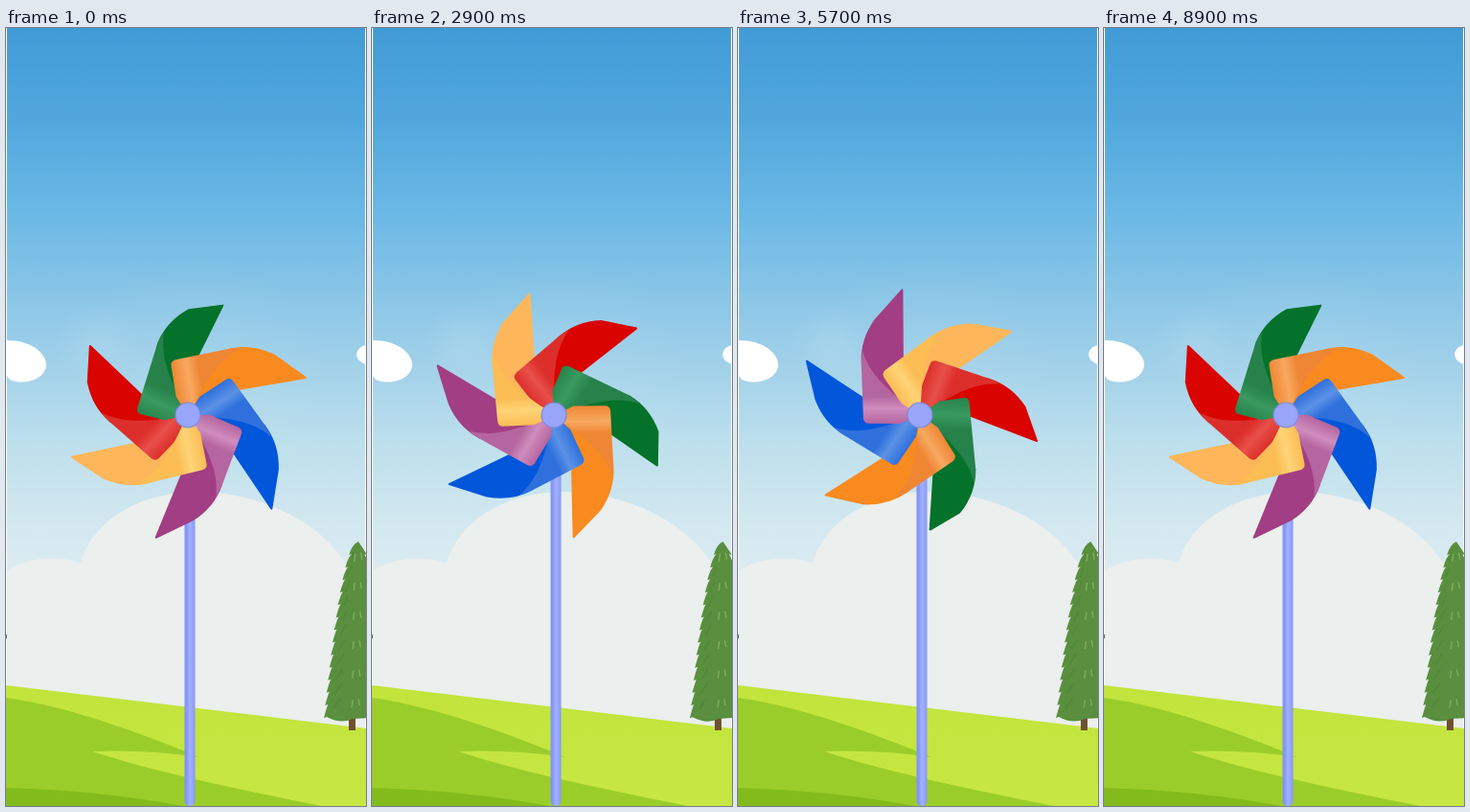
Write an HTML page with a canvas that moves like this. It is 376 by 812 pixels and loops after 9 s.

```html
<!DOCTYPE html>
<html lang="en">
<head>
<meta charset="utf-8">
<title>Pinwheel</title>
<style>
html, body { margin: 0; width: 100%; height: 100%; overflow: hidden; }
canvas { display: block; width: 376px; height: 812px; }
</style>
</head>
<body>
<canvas id="stage" width="376" height="812"></canvas>
<script>
const W = 376, H = 812, LOOP = 9000, STEP = 100;
const ctx = document.getElementById('stage').getContext('2d');
const RAD = Math.PI / 180;

// sail, roll edge, roll shine, angle, tip radius, lag of the rolled corner
const BLADES = [
  ['#d90400', '#dc2f2c', '#e8504a', 215.2, 126, 0],
  ['#04722a', '#26814a', '#3a9a60', 287.6, 121, 13],
  ['#f98a1f', '#ee8634', '#f8a960', 342.4, 130, 0],
  ['#0256da', '#2f70dc', '#5c92e6', 48.2, 132, 0],
  ['#a23e83', '#b5659f', '#cf8cbd', 104.6, 133, 0],
  ['#fdb75a', '#fbbd54', '#fed477', 160.2, 130, 0]
];

// time (ms), value, speed per 100 ms
const SPIN = [
  [0, 0, -5], [2100, -163, -10.5], [3700, -396.2, -19.5], [4900, -683.7, -27.3],
  [5700, -922.7, -32.5], [6600, -1243, -35], [8900, -1800, -8], [9000, -1800, 0]
];
const SWAY = [
  [0, 0, 0], [2100, -1, -0.06], [3700, -2, -0.1], [4900, -4, 0],
  [5700, 0.4, 0], [6600, 0, 0], [9000, 0, 0]
];

function track(keys, t) {
  let i = 0;
  while (i < keys.length - 2 && t >= keys[i + 1][0]) i++;
  const [t0, a, va] = keys[i], [t1, b, vb] = keys[i + 1];
  const n = (t1 - t0) / 100, u = (t - t0) / (t1 - t0), w = 1 - u;
  return a * (1 + 2 * u) * w * w + b * (1 + 2 * w) * u * u
    + va * n * u * w * w - vb * n * w * u * u;
}

function shape(c, d, fill) {
  c.fillStyle = fill;
  c.fill(new Path2D(d));
}

function ramp(c, x0, y0, x1, y1, stops) {
  const g = c.createLinearGradient(x0, y0, x1, y1);
  for (const [p, col] of stops) g.addColorStop(p, col);
  return g;
}

function haze(c, x, y, r, alpha) {
  const g = c.createRadialGradient(x, y, r * 0.2, x, y, r);
  g.addColorStop(0, `rgba(200,230,242,${alpha})`);
  g.addColorStop(1, 'rgba(200,230,242,0)');
  c.fillStyle = g;
  c.fillRect(x - r, y - r, 2 * r, 2 * r);
}

function paintScene(c) {
  c.fillStyle = ramp(c, 0, 0, 0, 600, [
    [0, '#419bd6'], [0.16, '#51a7dd'], [0.32, '#6ab8e5'], [0.45, '#86c4e6'],
    [0.58, '#a0d0e9'], [0.72, '#bcdfec'], [0.87, '#d4e8f0'], [1, '#e0eef2']
  ]);
  c.fillRect(0, 0, W, H);
  haze(c, 95, 328, 44, 0.18);
  haze(c, 200, 380, 140, 0.16);

  shape(c, 'M0 567C20 553 52 550 78 558C91 513 140 484 202 484C264 485 324 513 353 556L376 574V740H0Z', '#ebefed');
  shape(c, 'M0 326C22 325 42 337 42 352C41 366 20 374 4 367L0 362Z', '#fff');
  shape(c, 'M376 331C363 334 363 347 376 351Z', '#fff');
  c.fillStyle = '#fff';
  c.fillRect(0, 0, 1, 690);
  c.fillRect(375, 0, 1, 730);
  c.fillStyle = '#6c7a58';
  c.fillRect(0, 633, 1, 4);

  shape(c, 'M0 686L376 731V812H0Z', ramp(c, 0, 686, 0, 812, [[0, '#c1e43b'], [1, '#c7e744']]));
  shape(c, 'M0 699C70 709 140 736 202 761Q145 753 90 755C150 775 230 792 330 812H0Z', '#9bcd2a');
  shape(c, 'M0 793Q100 796 185 812H0Z', '#83bb1d');
}

function paintTree(lean) {
  ctx.save();
  ctx.translate(362, 733);
  ctx.rotate(lean / 196);
  ctx.translate(-362, -733);
  ctx.fillStyle = '#70502f';
  ctx.fillRect(358, 718, 7, 15);

  const rows = 14, edge = [];
  const mid = p => 368 - 3 * p;
  const half = p => 33 * Math.pow(p, 0.47);
  ctx.beginPath();
  ctx.moveTo(368, 536);
  for (let i = 0; i < rows; i++) {
    const p = (i + 1) / rows, y = 537 + 183 * p;
    edge.push([mid(p) + half(p), y]);
    ctx.quadraticCurveTo(mid(p) - half(p) + 3, y - 11, mid(p) - half(p), y);
    ctx.lineTo(mid(p) - half(p) + 3, y - 1);
  }
  ctx.quadraticCurveTo(350, 727, 362, 721);
  for (const [x, y] of edge.reverse()) {
    ctx.lineTo(x - 3, y - 1);
    ctx.lineTo(x, y);
  }
  ctx.closePath();
  ctx.fillStyle = '#598f3e';
  ctx.fill();

  ctx.lineCap = 'round';
  for (let i = 0; i < 11; i++) {
    const p = (i + 1) / 12, y = 537 + 183 * p, x = mid(p);
    ctx.strokeStyle = '#528939';
    ctx.lineWidth = 1.5;
    ctx.beginPath();
    ctx.moveTo(x - half(p) * 0.5, y - 5);
    ctx.lineTo(x - half(p) * 0.72, y + 5);
    ctx.stroke();
    if (i % 2 === 0) {
      ctx.strokeStyle = '#82aa5f';
      ctx.beginPath();
      ctx.moveTo(x - 3, y - 3);
      ctx.lineTo(x - 4, y + 4);
      ctx.moveTo(x + 3, y - 4);
      ctx.lineTo(x + 4, y + 2);
      ctx.stroke();
    }
  }
  ctx.restore();
}

function paintPole() {
  ctx.fillStyle = ramp(ctx, 186, 0, 198, 0, [
    [0, '#7d8ff0'], [0.25, '#8799fb'], [0.5, '#a3b1ff'], [0.75, '#94a4ff'], [1, '#8294f2']
  ]);
  ctx.beginPath();
  ctx.roundRect(186.5, 404, 11, 408, [0, 0, 5, 5]);
  ctx.fill();
}

function eachBlade(spin, draw) {
  for (const b of BLADES) {
    ctx.save();
    ctx.translate(190, 404);
    ctx.rotate((b[3] + spin) * RAD);
    draw(b);
    ctx.restore();
  }
}

function paintSail([color, , , , r]) {
  const p = new Path2D(`M0 0L14 -46L62 -52Q86 -50 105 -32L${r - 1} 0L36 -13Z`);
  ctx.fillStyle = ctx.strokeStyle = color;
  ctx.lineWidth = 2;
  ctx.lineJoin = 'round';
  ctx.fill(p);
  ctx.stroke(p);
}

function paintRoll([, base, shine, , , lag]) {
  const x = 1 - lag, y = -59 + lag / 2;
  shape(ctx, `M0 0L${-6 - lag / 2} -22L${x - 2} ${y + 4}Q${x - 1} ${y} ${x + 4} ${y}L62 -53L76 -50C50 -47 29 -29 3 -2Z`,
    ramp(ctx, x - 4, -42, 54, -34, [[0, base], [0.28, shine], [0.5, base], [1, base]]));
}

function paintHub() {
  ctx.beginPath();
  ctx.arc(190, 404, 13, 0, 2 * Math.PI);
  ctx.fillStyle = '#98a5f8';
  ctx.fill();
  ctx.strokeStyle = '#7d8ae2';
  ctx.lineWidth = 1.2;
  ctx.stroke();
}

const scene = document.createElement('canvas');
scene.width = W;
scene.height = H;
paintScene(scene.getContext('2d'));

const start = performance.now();
function frame() {
  const now = (performance.now() - start) % LOOP;
  const t = Math.floor(now / STEP) * STEP;
  const spin = track(SPIN, t);
  ctx.drawImage(scene, 0, 0);
  paintTree(track(SWAY, t));
  paintPole();
  eachBlade(spin, paintSail);
  eachBlade(spin, paintRoll);
  paintHub();
  requestAnimationFrame(frame);
}
frame();
</script>
</body>
</html>
```
